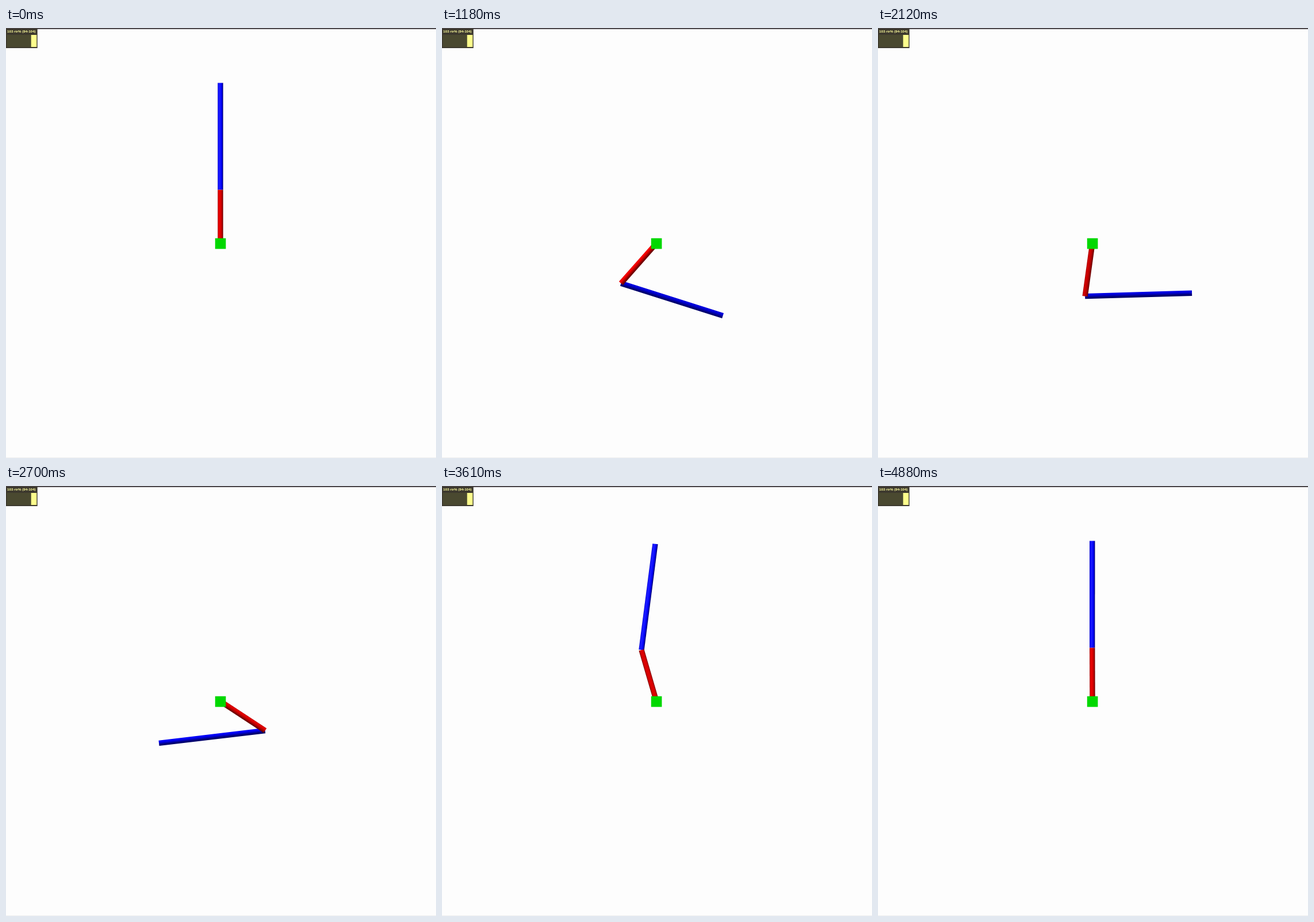
Write an HTML page with a canvas that moves like this. It is 748 px wide and 748 px high and loops after 4910 ms.

```html
<!DOCTYPE html>
<html lang="en">
<head>
<meta charset="utf-8">
<title>Acrobot swing-up</title>
<style>
  html, body { margin: 0; width: 100%; height: 100%; overflow: hidden; background: #fdfdfd; }
  canvas { display: block; width: 748px; height: 748px; }
</style>
</head>
<body>
<canvas id="stage" width="748" height="748"></canvas>
<script>
const ctx = document.getElementById('stage').getContext('2d');
const LOOP = 4910;
const BASE = { x: 373, y: 374.5 };
const LEN1 = 93, LEN2 = 186, HALF = 4.7;
const LIGHT = { x: 200, y: -200, z: 420 };

// Swing-up poses; angles in degrees from straight down
const POSES = [
  { t: 30, upper: 6, lower: 0 },
  { t: 550, upper: -24, lower: 24 },
  { t: 1180, upper: -41.5, lower: 72.3 },
  { t: 1640, upper: -33, lower: 81.7 },
  { t: 2120, upper: -8, lower: 91.7 },
  { t: 2240, upper: 1, lower: 83 },
  { t: 2480, upper: 48, lower: 0 },
  { t: 2700, upper: 56.8, lower: -82.9 },
  { t: 3180, upper: -105.5, lower: -212 }
];
const LAST = POSES.length - 1;
const CATCH = POSES[LAST];
const UPPER_DECAY = 283, LOWER_DECAY = 154;
const EXIT_SLOPE = { upper: -(180 + CATCH.upper) / UPPER_DECAY, lower: 0 };

const rate = (a, b, arm) => (b[arm] - a[arm]) / (b.t - a.t);

function slope(i, arm) {
  if (i === 0) return 0;
  if (i === LAST) return EXIT_SLOPE[arm];
  const [a, b, c] = POSES.slice(i - 1, i + 2);
  return (rate(a, b, arm) * (c.t - b.t) + rate(b, c, arm) * (b.t - a.t)) / (c.t - a.t);
}

function swing(t, arm) {
  const i = POSES.findIndex(p => p.t > t) - 1;
  const a = POSES[i], b = POSES[i + 1], h = b.t - a.t;
  const u = (t - a.t) / h, v = 1 - u;
  return v * v * (1 + 2 * u) * a[arm] + u * u * (3 - 2 * u) * b[arm]
    + h * u * v * (v * slope(i, arm) - u * slope(i + 1, arm));
}

// Damped settling into the upright balance
function settle(t) {
  const dt = t - CATCH.t, x = dt / LOWER_DECAY;
  return {
    upper: -180 + (180 + CATCH.upper) * Math.exp(-dt / UPPER_DECAY),
    lower: -180 + (180 + CATCH.lower) * (1 + x) * Math.exp(-x)
  };
}

function poseAt(t) {
  if (t < POSES[0].t) return { upper: 180, lower: 180 };
  if (t >= CATCH.t) return settle(t);
  return { upper: swing(t, 'upper'), lower: swing(t, 'lower') };
}

function endPoint(p, deg, len) {
  const a = deg * Math.PI / 180;
  return { x: p.x + len * Math.sin(a), y: p.y + len * Math.cos(a) };
}

function tint(color, shade) {
  const glow = 120 * Math.max(0, shade - 1);
  return `rgb(${color.map(v => Math.round(Math.min(255, v * shade + glow)))})`;
}

// Cylinder lit by a point light, shaded across its width
function rod(a, b, color) {
  const mx = (a.x + b.x) / 2, my = (a.y + b.y) / 2;
  const len = Math.hypot(b.x - a.x, b.y - a.y);
  const nx = -(b.y - a.y) / len, ny = (b.x - a.x) / len;
  const lx = LIGHT.x - mx, ly = LIGHT.y - my;
  const dist = Math.hypot(lx, ly, LIGHT.z);
  const power = 1.25 * (540 / dist) ** 2;
  const fill = ctx.createLinearGradient(
    mx - nx * HALF, my - ny * HALF, mx + nx * HALF, my + ny * HALF);
  for (let k = 0; k <= 8; k++) {
    const s = k / 4 - 1;
    const dot = (s * (nx * lx + ny * ly) + Math.sqrt(1 - s * s) * LIGHT.z) / dist;
    fill.addColorStop(k / 8, tint(color, 0.42 + power * Math.max(0, dot)));
  }
  ctx.strokeStyle = fill;
  ctx.lineWidth = HALF * 2;
  ctx.beginPath();
  ctx.moveTo(a.x, a.y);
  ctx.lineTo(b.x, b.y);
  ctx.stroke();
}

function box(color, x, y, w, h) {
  ctx.fillStyle = color;
  ctx.fillRect(x, y, w, h);
}

function drawPanel() {
  box('#4b464a', 0, 0, 748, 2);
  box('#eeeeee', 0, 747, 748, 1);
  box('#3d392e', 0, 1, 54.7, 34);
  box('#4a4930', 1.5, 12, 42.5, 21);
  box('#ffff8c', 43.7, 12, 9.6, 21);
  ctx.fillStyle = '#ffff9c';
  ctx.font = 'bold 6.2px "Liberation Sans", Arial, sans-serif';
  ctx.fillText('103 rtr% (94-104)', 2, 8.3);
}

function draw(t) {
  const pose = poseAt(t);
  const elbow = endPoint(BASE, pose.upper, LEN1);
  const tip = endPoint(elbow, pose.lower, LEN2);
  box('#fdfdfd', 0, 0, 748, 748);
  drawPanel();
  rod(elbow, tip, [0, 0, 255]);
  rod(BASE, elbow, [255, 0, 0]);
  box('#00d800', 363.8, 365.7, 18.6, 18.6);
}

const start = performance.now();
function tick() {
  draw((performance.now() - start) % LOOP);
  requestAnimationFrame(tick);
}
tick();
</script>
</body>
</html>
```
